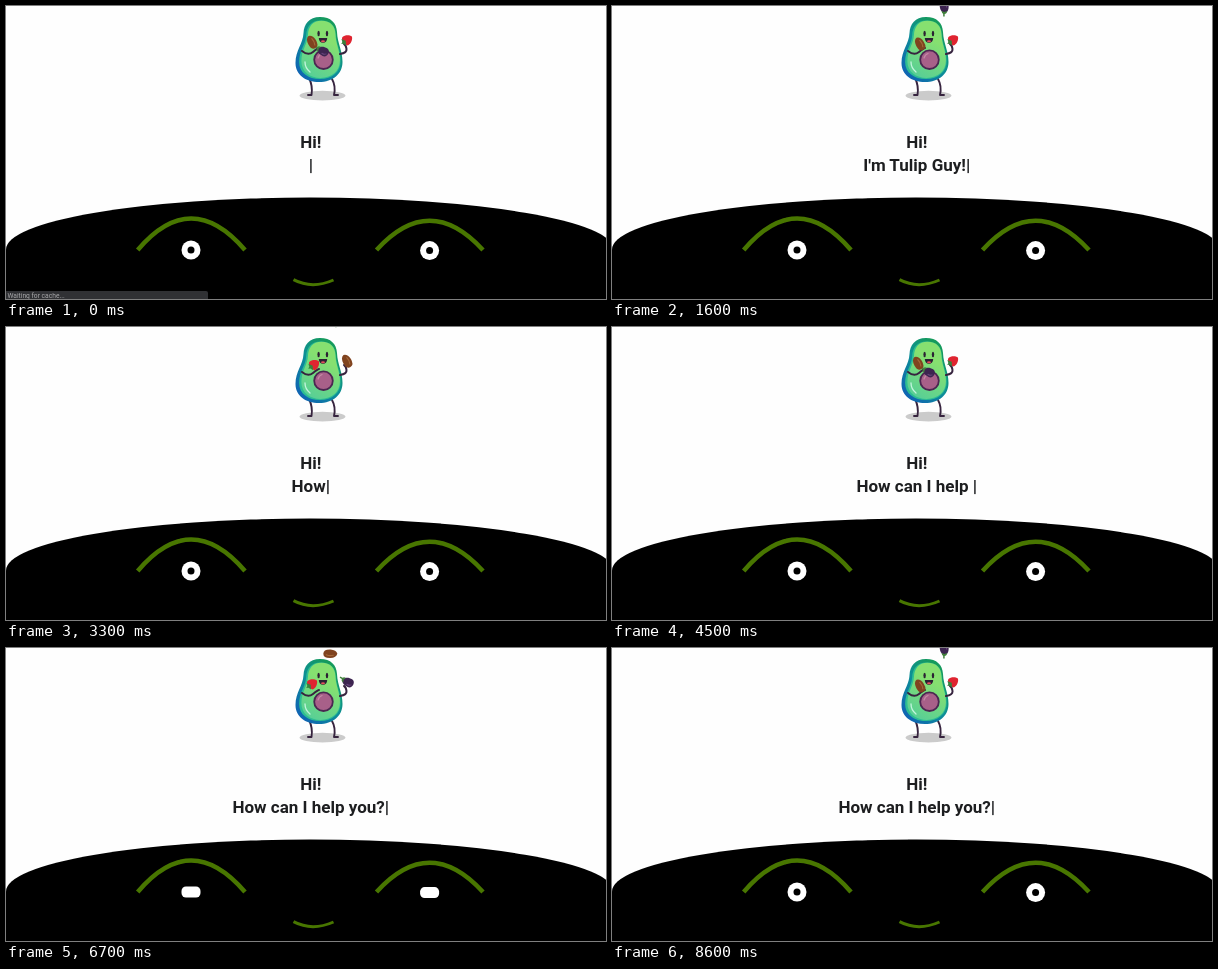
Write an HTML page that moves like this. It is 600 px wide and 293 px high and loops after 8700 ms.

```html
<!DOCTYPE html>
<html lang="en">
<head>
<meta charset="utf-8">
<title>Greeting</title>
<style>
  html, body { margin: 0; width: 100%; height: 100%; overflow: hidden; background: #fefefe; }
  svg { display: block; width: 100%; height: 100%; }
  .talk { font: 700 17px Roboto, sans-serif; fill: #1d1e20; text-anchor: middle; white-space: pre; }
  .status { font: 6.7px Roboto, sans-serif; fill: #a9a9ab; }
  .line { fill: none; stroke-linecap: round; stroke-linejoin: round; }
</style>
</head>
<body>
<svg viewBox="0 0 600 293">
  <defs>
    <linearGradient id="skin" x1="1" y1="0" x2="0.2" y2="1">
      <stop offset="0.2" stop-color="#159a5c"/>
      <stop offset="0.55" stop-color="#0d8f96"/>
      <stop offset="1" stop-color="#0f62b4"/>
    </linearGradient>
    <linearGradient id="flesh" x1="0.7" y1="0" x2="0.3" y2="1">
      <stop offset="0.3" stop-color="#86e070"/>
      <stop offset="1" stop-color="#58cf96"/>
    </linearGradient>
    <path id="pear" d="M314 11C303 11 298 18 297.500 27C297 38 289.500 44 289.500 57C289.500 69 300 76 313 76C327 76 336.500 68 336.500 56C336.500 44 331.500 38 331 26C330.500 17 325 11 314 11Z"/>
  </defs>

  <path d="M0 293V243.500A304 52 0 0 1 608 243.500V293Z"/>
  <g class="line" stroke="#487600" style="stroke-linecap:butt">
    <path d="M131.700 244Q185 181 239 244" stroke-width="4.500"/>
    <path d="M370.500 244Q423.500 185.500 477 244" stroke-width="4.500"/>
    <path d="M287.500 273.700Q306 283.500 327.500 274" stroke-width="3"/>
  </g>
  <g id="eyes"></g>

  <ellipse cx="316.500" cy="89.600" rx="23" ry="4.800" fill="#cbcbcb"/>
  <path class="line" d="M303 72Q307 80 305.500 89H302M326 73Q330 80 328 89H332" stroke="#37243f" stroke-width="1.900"/>
  <use href="#pear" fill="url(#skin)"/>
  <use href="#pear" fill="#2dbd92" transform="translate(37.200 4.600) scale(.884 .9)"/>
  <use href="#pear" fill="url(#flesh)" transform="translate(58 5) scale(.82 .88)"/>
  <path class="line" d="M299 56Q299 62 304 66" stroke="#c3f5de" stroke-width="1.300"/>
  <circle cx="317.500" cy="53.700" r="9.300" fill="#a86089" stroke="#4b2751" stroke-width="1.800"/>
  <path class="line" d="M312 52Q313 48.500 316 47.500" stroke="#c48aa6" stroke-width="1.300"/>
  <g fill="#2b2233">
    <ellipse cx="312.600" cy="27.500" rx="1.200" ry="2.700"/>
    <ellipse cx="321" cy="27.500" rx="1.200" ry="2.700"/>
    <path d="M312.800 32H321.200Q321 36.800 317 36.800T312.800 32Z"/>
  </g>
  <ellipse cx="317" cy="35.200" rx="2" ry="1" fill="#e2505a"/>
  <path class="line" d="M296 45Q302 50 307 46T313 42M334 48Q341 47 340.500 43T338 38" stroke="#37243f" stroke-width="2"/>

  <g id="aubergine">
    <path d="M0-5C4-4 5 0 5 3C5 8-4 8-4 3C-4 0-4-4 0-5Z" fill="#3d2450"/>
    <path class="line" d="M-2 1Q-2.300 4-.5 5" stroke="#68457b" stroke-width="1"/>
    <path d="M-2.500-3Q-2-6 0-6V-8.500H1.500V-6Q3-5 3-3L.5-4Z" fill="#41803c"/>
  </g>
  <g id="nut">
    <path d="M-7 0Q-6-4 0-4.300Q7-4.500 7 0T0 4.300Q-6 4-7 0Z" fill="#80431f"/>
    <path class="line" d="M-3-1.500Q1-2.500 4-1" stroke="#a3683a" stroke-width="1.200"/>
  </g>
  <g id="berry">
    <path d="M0 6C-3 5-5.500 1-5-2C-4.500-5 4.500-5 5-2C5.500 1 3 5 0 6Z" fill="#df2430"/>
    <path d="M-4-4L-1-5L0-7L1-5L4-4L1.500-2.500L0-1.500L-1.500-2.500Z" fill="#38803b"/>
  </g>

  <text class="talk" x="304.800" y="142">Hi!</text>
  <text class="talk" id="typed" x="304.800" y="165"></text>

  <g id="status">
    <path d="M0 285H200Q202 285 202 287V293H0Z" fill="#303134"/>
    <text class="status" x="1.500" y="292.400">Waiting for cache...</text>
  </g>
</svg>
<script>
const LOOP = 8700, STEP = 100, JUGGLE = 500, BLINK = 4000;
const $ = id => document.getElementById(id);
const clamp = (v, lo, hi) => Math.min(hi, Math.max(lo, v));
const mix = (a, b, k) => a + (b - a) * k;

const HANDS = { toss: [316, 45], right: [341, 34], left: [306, 36] };
const PROPS = [
  { id: "aubergine", offset: 0, tilt: -60 },
  { id: "nut", offset: 0.7, tilt: 60 },
  { id: "berry", offset: 0.3, tilt: -125 }
];

const between = (a, b, k) => [mix(a[0], b[0], k), mix(a[1], b[1], k)];

// A parabolic throw with one full turn
function fly(a, b, k) {
  const [x, y] = between(a, b, k);
  return [x, y - 160 * k * (1 - k), 360 * k];
}

// Throw right, rest, throw back, swing towards the next toss
function juggle(u) {
  const { toss, right, left } = HANDS;
  if (u < 0.3) return fly(toss, right, u / 0.3);
  if (u < 0.5) return [...right, 0];
  if (u < 0.7) return fly(right, left, (u - 0.5) / 0.2);
  return [...between(left, toss, ((u - 0.7) / 0.3) ** 4), 0];
}

function typedText(t) {
  const first = "I'm Tulip Guy!", second = "How can I help you?";
  if (t >= 3000) return second.slice(0, Math.floor((t - 3000) / 100));
  const erased = Math.max(0, Math.floor((t - 2200) / 50));
  return first.slice(0, Math.max(0, Math.min(Math.floor(t / 100), first.length - erased)));
}

function blink(t) {
  const u = t % BLINK;
  return clamp((u - 2250) / 250, 0, 1) * clamp((2950 - u) / 250, 0, 1);
}

function eye(x, y, shut) {
  const h = mix(19, 11, shut);
  return `<rect x="${x - 9.5}" y="${y - h / 2}" width="19" height="${h}" rx="${mix(9.5, 4.5, shut)}" fill="#fff"/>` +
    `<ellipse cx="${x}" cy="${y}" rx="3.5" ry="${mix(3.5, 0, shut)}"/>`;
}

function draw(t) {
  $("typed").textContent = typedText(t) + "|";
  $("status").style.display = t < 300 ? "" : "none";
  const shut = blink(t);
  $("eyes").innerHTML = eye(185, 244, shut) + eye(423.6, 244.6, shut);
  for (const { id, offset, tilt } of PROPS) {
    const [x, y, turn] = juggle((t / JUGGLE + offset) % 1);
    $(id).setAttribute("transform", `translate(${x} ${y}) rotate(${tilt + turn})`);
  }
}

const start = performance.now();
function tick() {
  const t = (performance.now() - start) % LOOP;
  draw(Math.floor(t / STEP) * STEP);
  requestAnimationFrame(tick);
}
tick();
</script>
</body>
</html>
```
